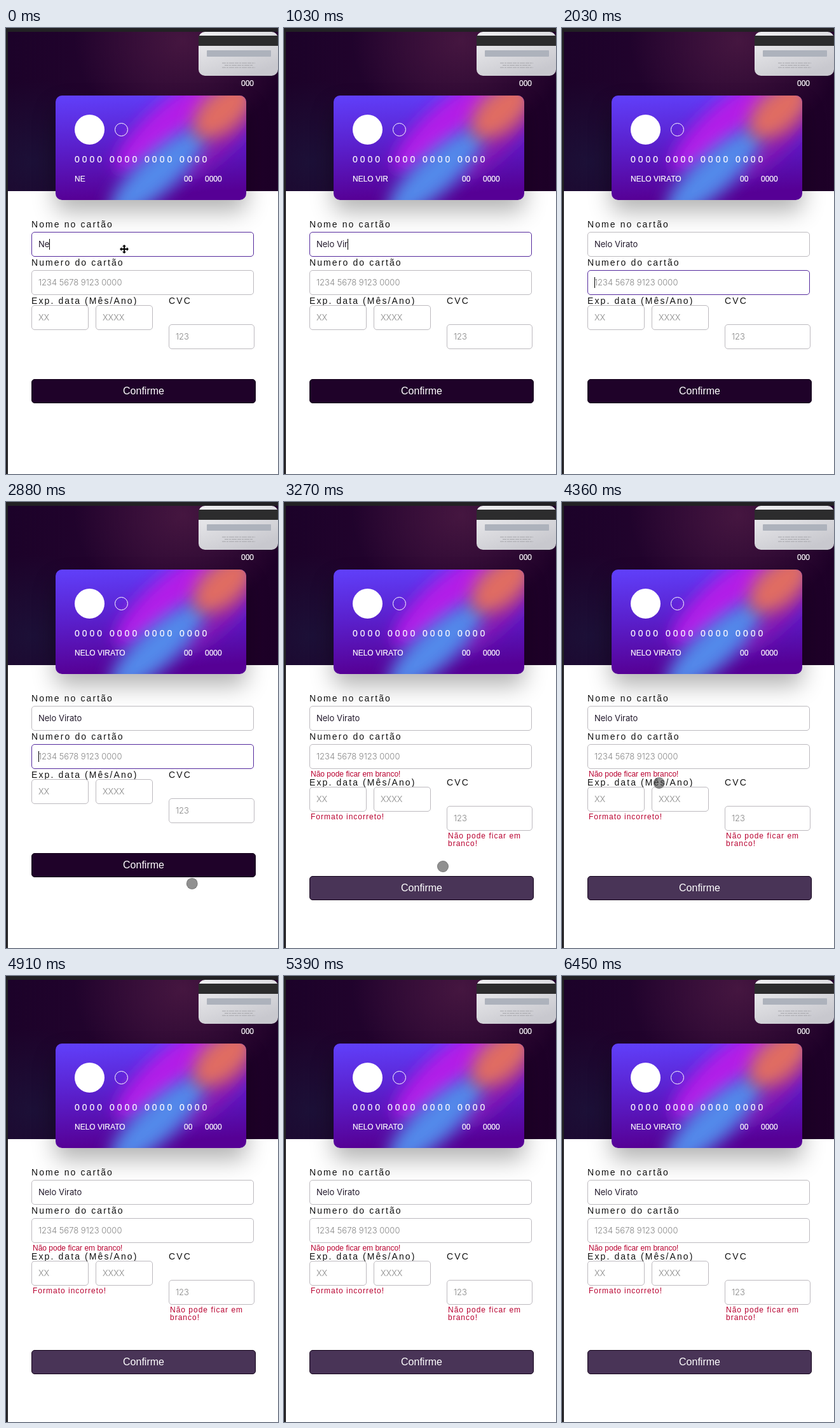
An HTML page that plays this animation: 428 px wide and 700 px high, repeating every 6.51 s.

```html
<!DOCTYPE html>
<html lang="pt-BR">
<head>
<meta charset="utf-8">
<title>Cartão</title>
<style>
  html, body { margin: 0; width: 100%; height: 100%; overflow: hidden; background: #fff; }
  #stage { position: relative; width: 428px; height: 700px; overflow: hidden; background: #fff; font-family: "Liberation Sans", Arial, sans-serif; }
  #stage > * { position: absolute; box-sizing: border-box; white-space: pre; }
  .edge { left: 0; top: 0; background: #222124; }
  .header {
    left: 3px; top: 6px; width: 425px; height: 250px;
    background:
      radial-gradient(ellipse 170px 150px at 275px 15px, #451640 0%, #45164000 100%),
      radial-gradient(ellipse 150px 130px at 40px 205px, #1c1037 0%, #1c103700 100%),
      linear-gradient(90deg, #1c0229, #260430 55%, #1d0027);
  }
  svg { left: 0; top: 0; }
  .card { left: 78px; top: 106px; width: 300px; height: 164px; border-radius: 10px; box-shadow: 0 18px 36px rgba(0, 0, 0, .3); }
  .on-card { font-size: 12px; line-height: 14px; color: #fff; -webkit-text-stroke: .2px #fff; }
  .number { font-size: 14px; line-height: 16px; letter-spacing: 4px; }
  .label { font-size: 14px; line-height: 16px; letter-spacing: 2.1px; color: #111; }
  .input {
    height: 39px; padding-left: 10px; border: 1px solid #bdbabf; border-radius: 5px; background: #fff;
    font: 13px/37px Inter, sans-serif; color: #21182b;
  }
  .input.focus { border-color: #552a9d; }
  .hint { font-weight: 300; color: #858585; }
  .caret { display: inline-block; width: 1px; height: 17px; margin-right: -1px; vertical-align: -4px; background: #000; }
  .error { font-size: 12px; line-height: 14px; color: #b8002f; }
  .spaced { letter-spacing: 1px; }
  .button {
    left: 40px; width: 353px; height: 38px; border: 1px solid #120018; border-radius: 5px;
    background: #1f0229; color: #fff; font-size: 16px; line-height: 36px; text-align: center;
  }
  .button.hover { background: #493457; }
  .touch { left: -9px; top: -9px; width: 18px; height: 18px; border-radius: 50%; background: rgba(65, 65, 65, .58); border: 1px solid rgba(70, 70, 70, .3); }
</style>
</head>
<body>
<div id="stage">
  <div class="edge" style="width:428px;height:6px"></div>
  <div class="edge" style="width:3px;height:700px"></div>
  <div class="header"></div>
  <div class="card"></div>
  <svg width="428" height="280" viewBox="0 0 428 280">
    <defs>
      <linearGradient id="base" x2=".12" y2="1">
        <stop stop-color="#6040fb"/><stop offset=".5" stop-color="#5a1fcb"/><stop offset="1" stop-color="#560095"/>
      </linearGradient>
      <linearGradient id="silver" x2=".6" y2="1">
        <stop stop-color="#f0f0f2"/><stop offset="1" stop-color="#c8c8ce"/>
      </linearGradient>
      <clipPath id="cardShape"><rect x="78" y="106" width="300" height="164" rx="10"/></clipPath>
      <filter id="soft" x="-60%" y="-100%" width="220%" height="300%"><feGaussianBlur stdDeviation="13"/></filter>
    </defs>
    <g clip-path="url(#cardShape)">
      <rect x="78" y="106" width="300" height="164" fill="url(#base)"/>
      <g id="glow"></g>
    </g>
    <circle cx="131.5" cy="159.5" r="23.5" fill="#fff"/>
    <circle cx="181.5" cy="159.5" r="10" fill="none" stroke="#fff"/>
    <rect x="303" y="6" width="125" height="69" rx="10" fill="url(#silver)"/>
    <path d="M303 12h125v16h-125z" fill="#2c2c2d"/>
    <rect x="316" y="35" width="101" height="10" rx="1" fill="#adb2bc"/>
    <path d="M340 55h52M344 58.500h44M340 62h52" stroke="#a5a5aa" stroke-dasharray="6 1 3 1 8 1"/>
  </svg>
  <div class="touch" id="touch"></div>
</div>
<script>
const LOOP = 6510;
const NAME = "Nelo Virato";
const KEY_TIMES = [60, 240, 390, 580, 730, 900, 1060, 1270, 1480];
const FOCUS_NUMBER = 1880, SUBMIT = 3210, CURSOR_HIDDEN = 90;
// time, x, y of the touch pointer
const TOUCH_PATH = [
  [2550, 436, 560], [2700, 360, 588], [2880, 293, 599], [3000, 265, 585], [3120, 250, 572],
  [3550, 250, 572], [3640, 228, 510], [3730, 203, 445], [3950, 180, 440], [4180, 160, 441],
  [4360, 153, 441], [4600, 90, 443], [4820, -10, 450]
];
// centre, radii and colour of the card's diagonal light
const GLOWS = [
  [252, 152, 105, 30, "#b41fe8"], [338, 178, 80, 20, "#8714b4"],
  [238, 228, 98, 31, "#5289ea"], [342, 129, 58, 33, "#e06c62"]
];

const stage = document.getElementById("stage");
const touch = document.getElementById("touch");

document.getElementById("glow").innerHTML = GLOWS.map(([x, y, rx, ry, color]) =>
  `<ellipse rx="${rx}" ry="${ry}" fill="${color}" filter="url(#soft)" transform="translate(${x} ${y}) rotate(-42)"/>`).join("");

function add(className, x, y, text = "", width) {
  const el = document.createElement("div");
  el.className = className;
  el.style.left = x + "px";
  el.style.top = y + "px";
  if (width) el.style.width = width + "px";
  el.textContent = text;
  stage.insertBefore(el, touch);
  return el;
}

add("on-card", 370, 80, "000");
add("on-card number", 108, 198, "0000 0000 0000 0000");
const cardName = add("on-card", 108, 230);
add("on-card", 280, 230, "00");
add("on-card", 313, 230, "0000");

add("label", 40, 300, "Nome no cartão");
const nameInput = add("input", 40, 320, "", 350);
add("label", 40, 360, "Numero do cartão");
const numberInput = add("input", 40, 380, "", 350);
const lowered = [
  add("label", 40, 420, "Exp. data (Mês/Ano)"),
  add("label", 256, 420, "CVC"),
  add("input hint", 40, 435, "XX", 90),
  add("input hint", 141, 435, "XXXX", 90),
  add("input hint", 256, 465, "123", 135)
];
const errors = [
  add("error", 42, 420, "Não pode ficar em branco!"),
  add("error spaced", 42, 487, "Formato incorreto!"),
  add("error spaced", 258, 518, "Não pode ficar em\nbranco!")
];
errors[2].style.lineHeight = "12px";
const button = add("button", 40, 551, "Confirme");

const cursor = add("cursor", 179, 340);
cursor.innerHTML = `<svg width="14" height="14" viewBox="-7 -7 14 14" style="display:block">
  <path d="M-5 0H5M0-5V5" stroke="#000" stroke-width="2"/>
  <path d="M0-7l3 3h-6zM0 7l3-3h-6zM-7 0l3-3v6zM7 0l-3-3v6z"/></svg>`;

const caret = '<span class="caret"></span>';

function pointAt(path, t) {
  const i = path.findIndex(p => p[0] > t);
  if (i < 1) return null;
  const [t0, x0, y0] = path[i - 1], [t1, x1, y1] = path[i];
  const k = (t - t0) / (t1 - t0);
  return [x0 + (x1 - x0) * k, y0 + (y1 - y0) * k];
}

function render(t) {
  const typed = NAME.slice(0, 2 + KEY_TIMES.filter(k => t >= k).length);
  const onName = t < FOCUS_NUMBER;
  const sent = t >= SUBMIT;
  const onNumber = !onName && !sent;
  const caretOn = (t - FOCUS_NUMBER) % 980 < 490;

  cardName.textContent = typed.toUpperCase();
  nameInput.innerHTML = typed + (onName ? caret : "");
  nameInput.className = "input" + (onName ? " focus" : "");
  numberInput.innerHTML = (onNumber && caretOn ? caret : "") + "1234 5678 9123 0000";
  numberInput.className = "input hint" + (onNumber ? " focus" : "");

  for (const el of lowered) el.style.transform = `translateY(${sent ? 12 : 0}px)`;
  for (const el of errors) el.style.visibility = sent ? "visible" : "hidden";
  button.style.transform = `translateY(${sent ? 36 : 0}px)`;
  button.classList.toggle("hover", sent);
  cursor.style.visibility = t < CURSOR_HIDDEN ? "visible" : "hidden";

  const point = pointAt(TOUCH_PATH, t);
  touch.style.visibility = point ? "visible" : "hidden";
  if (point) touch.style.transform = `translate(${point[0]}px, ${point[1]}px)`;
}

const start = performance.now();
function tick() {
  render((performance.now() - start) % LOOP);
  requestAnimationFrame(tick);
}
tick();
</script>
</body>
</html>
```
